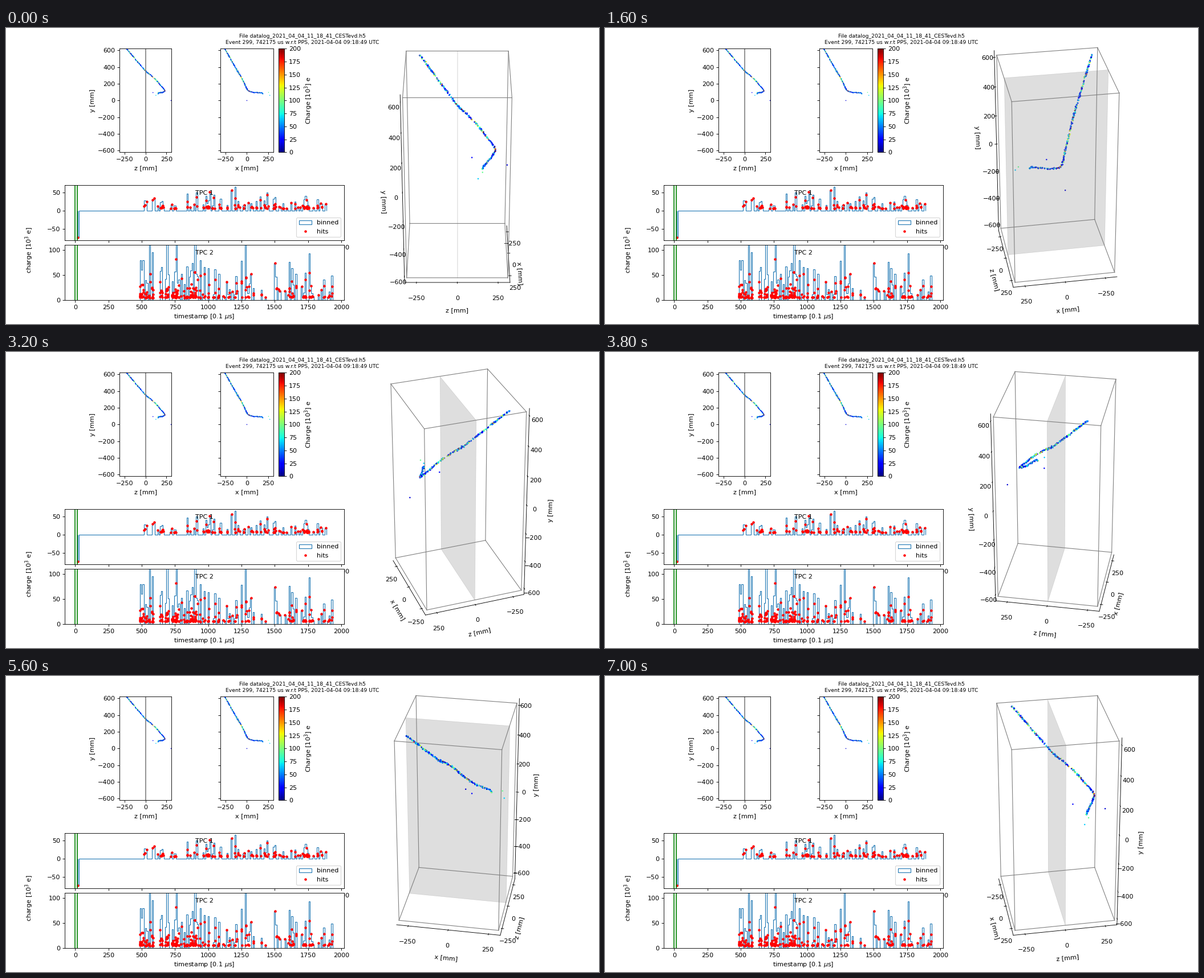
Animation, 1040 px wide and 520 px high, one loop 7200 ms. Source, as a matplotlib script:

```python
import matplotlib.pyplot as plt
import numpy as np
from matplotlib.animation import FuncAnimation
from mpl_toolkits.mplot3d.art3d import Poly3DCollection

WIDTH, HEIGHT, DPI = 1040, 520, 80
N_FRAMES, INTERVAL = 36, 200
HALF_X, HALF_Y, HALF_Z = 310, 620, 310
VIEW_MARGIN = 25 / 24
BIN = 10

plt.rcParams["font.family"] = "DejaVu Sans"
rng = np.random.default_rng(299)
fig = plt.figure(figsize=(WIDTH / DPI, HEIGHT / DPI), dpi=DPI)
fig.suptitle("File datalog_2021_04_04_11_18_41_CESTevd.h5\n"
             "Event 299, 742175 us w.r.t PPS, 2021-04-04 09:18:49 UTC",
             fontsize="small")


def add_axes(left, top, right, bottom, **kwargs):
    """Add axes from pixel edges measured from the top left corner."""
    rect = (left / WIDTH, 1 - bottom / HEIGHT,
            (right - left) / WIDTH, (bottom - top) / HEIGHT)
    return fig.add_axes(rect, **kwargs)


def make_track(n=340):
    """Scatter hits along a bent track; returns x, y, z and charge."""
    nodes = np.array([(-260, 620, -228), (-110, 352, 0), (-57, 262, 112),
                      (5, 130, 225), (25, 112, 230), (75, 97, 205),
                      (180, 92, 155), (190, 78, 150)])
    strays = np.array([(0, 0, 304), (75, 95, 88), (255, 97, 149), (270, 62, 123)])
    steps = np.linalg.norm(np.diff(nodes, axis=0), axis=1)
    length = np.concatenate([[0], np.cumsum(steps)])
    s = np.sort(rng.uniform(0, length[-1], n))
    points = np.array([np.interp(s, length, axis) for axis in nodes.T])
    points += rng.normal(0, 2.2, points.shape)
    points[1] = np.minimum(points[1], HALF_Y)
    charge = 14 + rng.gamma(1.1, 45, n)
    return (*np.hstack([points, strays.T]),
            np.concatenate([charge, [15, 25, 95, 65]]))


def draw_projections(x, y, z, charge):
    style = dict(c=charge, cmap="jet", vmin=0, vmax=200, s=2, linewidths=0)
    ax_zy = add_axes(199.3, 36.4, 290.3, 218.4)
    ax_xy = add_axes(376.3, 36.4, 468.6, 218.4)
    ax_zy.axvline(0, color="gray", lw=1.5)
    ax_zy.scatter(z, y, **style)
    hits = ax_xy.scatter(x, y, **style)
    for ax, name in ((ax_zy, "z"), (ax_xy, "x")):
        ax.set(xlim=(-HALF_X, HALF_X), ylim=(-HALF_Y, HALF_Y),
               xlabel=f"{name} [mm]", xticks=(-250, 0, 250),
               yticks=range(-600, 601, 200))
    ax_zy.set_ylabel("y [mm]")
    ax_xy.tick_params(labelleft=False)
    bar = fig.colorbar(hits, cax=add_axes(478, 36.4, 488, 218.4),
                       ticks=range(0, 201, 25))
    bar.set_label("Charge [$10^3$] e")


def make_hits(start, stop, rate, floor, spread):
    """Bursts of hits: a random share of the bins is active."""
    bins = np.arange(start, stop, BIN)
    active = rng.random(len(bins)) < 0.62
    counts = rng.poisson(rate(bins)) * active
    times = np.repeat(bins, counts) + rng.uniform(0, BIN, counts.sum())
    charges = floor + rng.gamma(0.6, spread, counts.sum())
    return times, charges


def draw_waveform(ax, title, first, times, charges):
    edges = np.arange(first, times.max() + BIN, BIN)
    ax.hist(times, bins=edges, weights=charges, histtype="step", label="binned")
    ax.plot(times, charges, "r.", label="hits")
    for t in (0, 17):
        ax.axvline(t, color="g", lw=1.5)
    ax.text(0.5, 0.82, title, ha="center", transform=ax.transAxes)
    ax.set(xlim=(-78, 2022), xticks=range(0, 2001, 250))


def draw_tpc1():
    ax = add_axes(103.3, 276, 593, 373)
    times, charges = make_hits(518, 1908, lambda t: 1.5 + 0 * t, 7, 13)
    # The trigger shows up as one negative pulse at the start
    draw_waveform(ax, "TPC 1", 18, np.append(times, 18), np.append(charges, -73))
    ax.set(ylim=(-80.5, 71), yticks=(-50, 0, 50))
    ax.legend(loc="lower right")


def draw_tpc2():
    ax = add_axes(103.3, 381, 593, 478)
    times, charges = make_hits(
        485, 1930, lambda t: 1.2 + 3.1 / (1 + np.exp((t - 1000) / 60)), 5, 17)
    draw_waveform(ax, "TPC 2", 485, times, charges)
    ax.set(ylim=(0, 110), yticks=(0, 50, 100),
           xlabel=r"timestamp [0.1 $\mu$s]")


def draw_detector(x, y, z, charge):
    """3D view with the vertical axis showing y and the depth axes x and z."""
    ax = add_axes(564.5, 25.6, 1006.5, 467.6, projection="3d", facecolor="none")
    ax.set_box_aspect((1, 1, 2))
    ax.grid(False)
    for axis in (ax.xaxis, ax.yaxis, ax.zaxis):
        axis.pane.set_visible(False)

    edge = dict(color="gray", lw=1)
    sides = (-1, 1)
    for a in sides:
        for b in sides:
            ax.plot([-HALF_X, HALF_X], [a * HALF_Z] * 2, [b * HALF_Y] * 2, **edge)
            ax.plot([a * HALF_X] * 2, [-HALF_Z, HALF_Z], [b * HALF_Y] * 2, **edge)
            ax.plot([a * HALF_X] * 2, [b * HALF_Z] * 2, [-HALF_Y, HALF_Y], **edge)

    cathode = [(a * HALF_X, 0, b * HALF_Y)
               for a, b in ((-1, -1), (1, -1), (1, 1), (-1, 1))]
    tint = (0.5, 0.5, 0.5, 0.26)
    ax.add_collection3d(Poly3DCollection([cathode], facecolors=[tint],
                                         edgecolors=[tint], linewidths=0.6))
    ax.scatter(x, z, y, c=charge, cmap="jet", vmin=0, vmax=200, s=5,
               linewidths=0, depthshade=False)

    lim_x, lim_y, lim_z = (VIEW_MARGIN * h for h in (HALF_X, HALF_Y, HALF_Z))
    ax.set(xlim=(-lim_x, lim_x), ylim=(-lim_z, lim_z), zlim=(-lim_y, lim_y),
           xticks=(-250, 0, 250), yticks=(-250, 0, 250),
           zticks=range(-600, 601, 200), xlabel="x [mm]", ylabel="z [mm]")
    ax.set_zlabel("y [mm]", labelpad=14)
    return ax


track = make_track()
draw_projections(*track)
draw_tpc1()
draw_tpc2()
fig.text(41 / WIDTH, 130 / HEIGHT, "charge [$10^3$ e]", rotation=90,
         ha="center", va="center")
detector = draw_detector(*track)


def update(frame):
    azim = 360 * frame / N_FRAMES
    # A tiny nudge settles which edges carry the axes in square-on views
    azim += 0.01 * np.sign(np.sin(np.radians(45 - azim)))
    detector.view_init(elev=30, azim=azim)
    return [detector]


anim = FuncAnimation(fig, update, frames=N_FRAMES, interval=INTERVAL,
                     repeat=True, repeat_delay=0)
plt.show()
```
